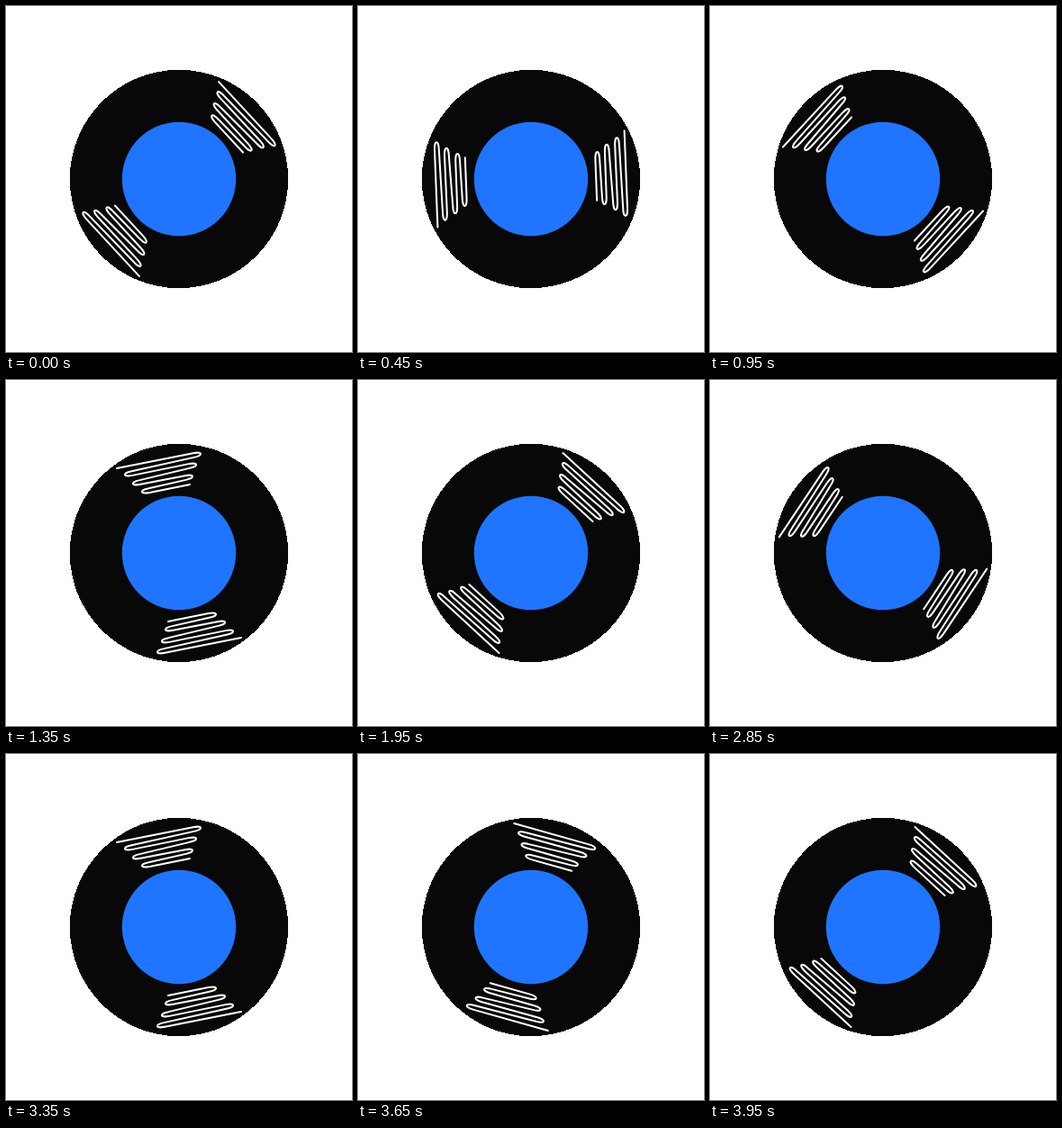
An HTML page for the animation above (4000 ms loop, 384 by 384 pixels).

```html
<!DOCTYPE html>
<html lang="en">
<head>
<meta charset="utf-8">
<title>Spinning record</title>
<style>
  html, body { margin: 0; width: 100%; height: 100%; overflow: hidden; background: #fff; }
  svg { display: block; width: 100vw; height: 100vh; }
  #grooves {
    fill: none;
    stroke: #fff;
    stroke-width: 2;
    stroke-linecap: round;
    stroke-linejoin: round;
  }
</style>
</head>
<body>
<svg viewBox="-192 -192 384 384">
  <circle r="121.2" fill="#080808" shape-rendering="crispEdges"/>
  <g id="grooves">
    <path/>
    <path transform="rotate(180)"/>
  </g>
  <circle r="63.2" fill="#1f75ff"/>
</svg>
<script>
  const LOOP = 4000;
  const STEPS = 80;
  const START_ANGLE = -42.5;

  // Scribble from the rim inwards: start, hairpin tips, end.
  const start = [105.4, -49.8];
  const tips = [[103.4, 44.5], [96.8, -42.3], [92.6, 37.4], [85.3, -35.4], [80.6, 30.9], [74.5, -27.3]];
  const end = [72.3, 26.3];

  function hairpin([x, y]) {
    const side = Math.sign(y), half = 2.4;
    const base = y - side * 8, pull = y + side * 2.67;
    return `L${x + half} ${base}C${x + half} ${pull} ${x - half} ${pull} ${x - half} ${base}`;
  }

  const d = `M${start}${tips.map(hairpin).join('')}L${end}`;
  const grooves = document.getElementById('grooves');
  grooves.querySelectorAll('path').forEach(path => path.setAttribute('d', d));

  function draw(now) {
    const step = Math.floor((now % LOOP) / LOOP * STEPS);
    grooves.setAttribute('transform', `rotate(${START_ANGLE + step * 360 / STEPS})`);
  }

  const origin = performance.now();
  function tick() {
    draw(performance.now() - origin);
    requestAnimationFrame(tick);
  }
  tick();
</script>
</body>
</html>
```
